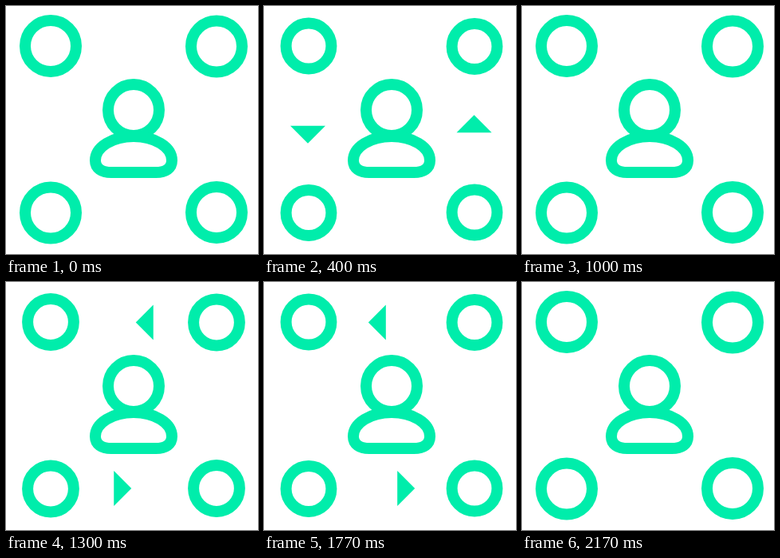
An HTML page that plays this animation: 316x310 px, repeating every 2210 ms.

```html
<!DOCTYPE html>
<html lang="en">
<head>
<meta charset="utf-8">
<title>Exchange around a user</title>
<style>
  html, body { margin: 0; width: 100%; height: 100%; overflow: hidden; background: #fff; }
  svg { display: block; width: 100%; height: 100%; }
  .line { fill: none; stroke: #00edab; stroke-width: 14; }
  .ring { fill: #fff; stroke: #00edab; stroke-width: 14; }
  .arrow { fill: #00edab; }
</style>
</head>
<body>
<svg viewBox="0 0 316 310">
  <g id="arrows"></g>
  <g id="rings"></g>
  <circle class="line" cx="160" cy="130" r="32"/>
  <path class="line" d="M112 193C112 176 134 163 160 163C186 163 208 176 208 193C208 203 200 208 188 208H132C120 208 112 203 112 193Z"/>
</svg>
<script>
const LOOP = 2210, HALF = 33, LAST = 65;
const corners = [[56, 50], [264, 50.5], [56, 258.5], [264, 258]];

// start, end, heading in degrees, half of the loop in which it travels
const routes = [
  [[55, 50], [55, 258], 90, 0],
  [[263.5, 258], [263.5, 50], -90, 0],
  [[264, 50.5], [56, 50.5], 180, 1],
  [[56, 258], [264, 258], 0, 1]
];

function add(parent, tag, attrs) {
  const el = document.createElementNS("http://www.w3.org/2000/svg", tag);
  for (const key in attrs) el.setAttribute(key, attrs[key]);
  return document.getElementById(parent).appendChild(el);
}

// Bezier easing with horizontal end tangents
function ease(x1, x2) {
  return x => {
    let lo = 0, hi = 1;
    for (let i = 0; i < 24; i++) {
      const s = (lo + hi) / 2, r = 1 - s;
      if (3 * s * r * r * x1 + 3 * s * s * r * x2 + s * s * s < x) lo = s;
      else hi = s;
    }
    return lo * lo * (3 - 2 * lo);
  };
}

const span = (v, a, b) => Math.min(1, Math.max(0, (v - a) / (b - a)));
const leave = ease(0.42, 0.07), arrive = ease(0.935, 0.577), soft = ease(0.4, 0.6);

// Fast out, slow in the middle, fast in
const travel = f => 0.533 * leave(span(f, 0, 12.5)) + 0.467 * arrive(span(f, 12.5, 29.5));
const radius = f => 32 - 3.6 * (soft(span(f, 0, 8)) - soft(span(f, 21, 29)));

const rings = corners.map(([cx, cy]) => add("rings", "circle", { class: "ring", cx, cy }));
const arrows = routes.map(([from, to, angle, half]) => ({
  from, to, angle, half,
  el: add("arrows", "path", { class: "arrow", d: "M-11 -22L11 0L-11 22Z" })
}));

function draw(ms) {
  const step = Math.min(LAST, Math.floor((ms + 5) * 0.03));
  const half = step < HALF ? 0 : 1;
  const local = step - half * HALF;
  const r = radius(local), p = travel(local);

  for (const ring of rings) ring.setAttribute("r", r);
  for (const a of arrows) {
    const x = a.from[0] + (a.to[0] - a.from[0]) * p;
    const y = a.from[1] + (a.to[1] - a.from[1]) * p;
    a.el.setAttribute("transform", `translate(${x} ${y}) rotate(${a.angle})`);
    a.el.setAttribute("visibility", a.half === half ? "visible" : "hidden");
  }
}

const start = performance.now();
function tick() {
  draw((performance.now() - start) % LOOP);
  requestAnimationFrame(tick);
}
draw(0);
requestAnimationFrame(tick);
</script>
</body>
</html>
```
